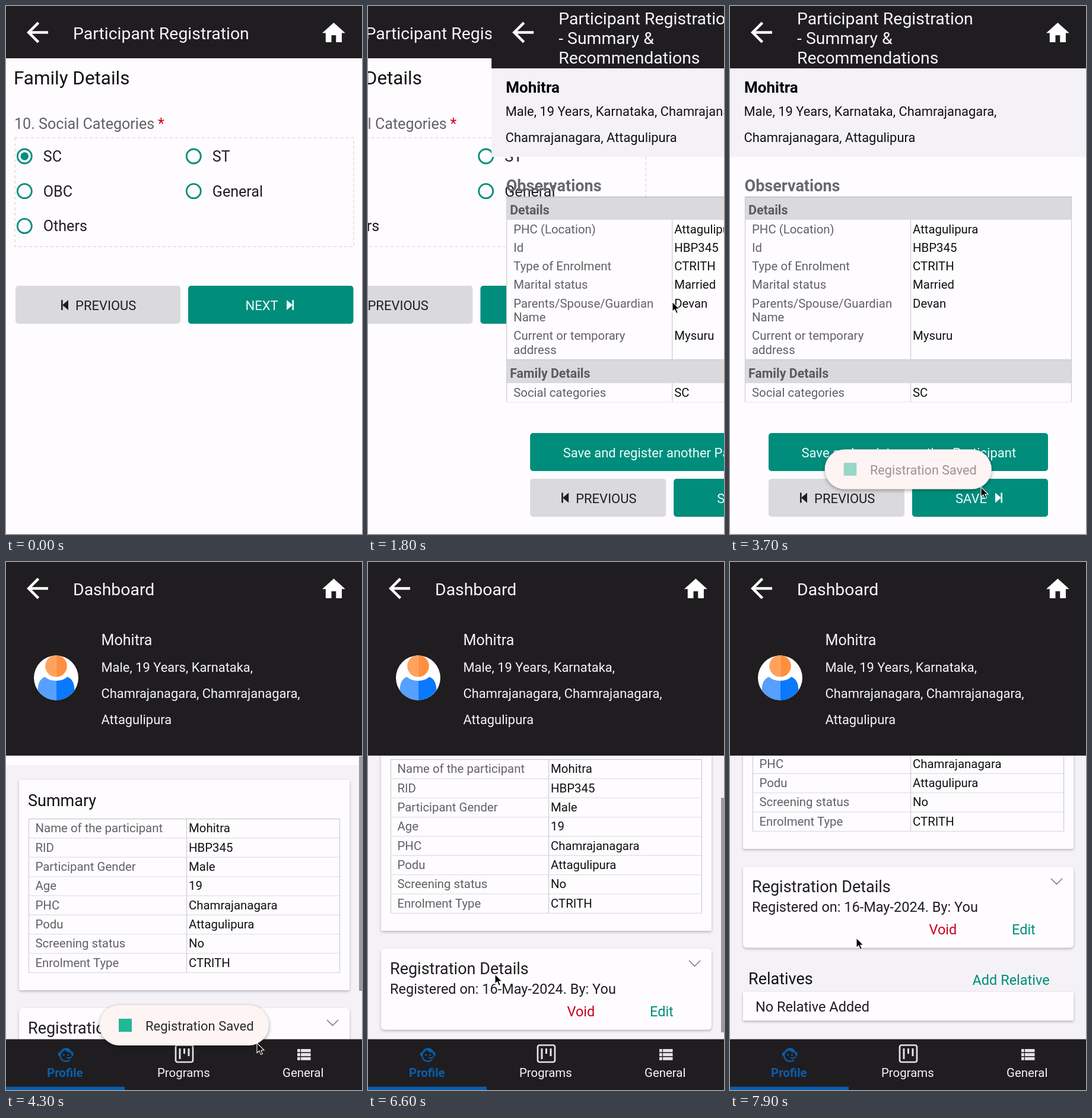
Write an HTML page that moves like this. It is 600x889 px and loops after 8000 ms.

```html
<!DOCTYPE html>
<html lang="en">
<head>
<meta charset="utf-8">
<title>Participant registration</title>
<style>
  html, body { margin: 0; width: 100%; height: 100%; overflow: hidden; background: #fefcff; }
  svg { display: block; width: 100vw; height: 100vh; font-family: Roboto, "Open Sans", sans-serif; }
  .card { filter: drop-shadow(0 2px 2px rgba(0, 0, 0, .25)); }
  .toast { filter: drop-shadow(0 2px 3px rgba(0, 0, 0, .35)); }
</style>
</head>
<body>
<svg id="stage" viewBox="0 0 600 889" preserveAspectRatio="none"></svg>
<script>
const LOOP = 8000, STEP = 100;
const TEAL = '#008d7c', DARK = '#1f1d20', GREY = '#dad9db', PAPER = '#fefcff';
const LABEL = '#626163', INK = '#1f1d20', LINE = '#cfced0';
const person = 'Mohitra', guardian = 'Devan';

// Drawing helpers
const text = (x, y, size, fill, s, extra = '') =>
  `<text x="${x}" y="${y}" font-size="${size}" fill="${fill}" ${extra}>${s.replace(/&/g, '&amp;')}</text>`;
const bold = (x, y, size, fill, s) => text(x, y, size, fill, s, 'font-weight="700"');
const rect = (x, y, w, h, fill, extra = '') =>
  `<rect x="${x}" y="${y}" width="${w}" height="${h}" fill="${fill}" ${extra}/>`;
const path = (d, fill, extra = '') => `<path d="${d}" fill="${fill}" ${extra}/>`;
const stroke = (d, color, width = 1) => path(d, 'none', `stroke="${color}" stroke-width="${width}"`);
const group = (id, body, extra = '') => `<g id="${id}" ${extra}>${body}</g>`;
const button = (x, y, w, fill) => rect(x, y, w, 64, fill, 'rx="5"');

const skipIcon = (x, y, dir, fill) =>
  `<g transform="translate(${x + 6} ${y}) scale(${dir} 1)">` +
  path('M-6-8.5L4 0L-6 8.5Z', fill) + rect(3.4, -8.5, 2.6, 17, fill) + '</g>';

function header(lines, height) {
  const first = lines.length > 1 ? 31 : 56;
  return rect(0, 0, 600, height, DARK) +
    path('M20 11H7.83l5.59-5.59L12 4l-8 8 8 8 1.41-1.41L7.83 13H20z', '#fff', 'transform="translate(26 17.5) scale(2.25)"') +
    path('M10 20V14H14V20H19V12H22L12 3L2 12H5V20Z', '#fff', 'transform="translate(529.1 22.2) scale(1.94)"') +
    lines.map((s, i) => text(113, first + 33 * i, 28.4, '#f6f5f7', s)).join('');
}

function radio(x, y, label, on) {
  return `<circle cx="${x}" cy="${y}" r="12" fill="none" stroke="${TEAL}" stroke-width="2.8"/>` +
    (on ? `<circle cx="${x}" cy="${y}" r="6.7" fill="${TEAL}"/>` : '') +
    text(x + 31.5, y + 9, 25.1, INK, label);
}

function formScreen() {
  return rect(0, 0, 600, 889, PAPER) + header(['Participant Registration'], 88) +
    text(13, 132, 31.4, '#111', 'Family Details') +
    text(14, 206.5, 25.1, LABEL, '10. Social Categories') +
    text(256, 206.5, 25.1, '#d5001c', '*') +
    path('M15 222H586V405H15Z', 'none', 'stroke="#dddcde" stroke-width="1.6" stroke-dasharray="5 4"') +
    radio(31.3, 253, 'SC', true) + radio(316.3, 253, 'ST') +
    radio(31.3, 311.7, 'OBC') + radio(316.3, 311.7, 'General') +
    radio(31.3, 370.4, 'Others') +
    button(16, 471, 278, GREY) + skipIcon(93, 503.5, -1, INK) + text(117, 511.5, 22, INK, 'PREVIOUS') +
    button(307, 471, 278.5, TEAL) + text(403.5, 511.5, 22, '#e9fffb', 'NEXT') + skipIcon(473, 503.5, 1, '#e9fffb');
}

function summaryScreen() {
  const rows = [
    [382.5, 'PHC (Location)', 'Attagulipura'],
    [413.7, 'Id', 'HBP345'],
    [445, 'Type of Enrolment', 'CTRITH'],
    [476.3, 'Marital status', 'Married'],
    [507.7, 'Parents/Spouse/Guardian', guardian],
    [531, 'Name', ''],
    [562.3, 'Current or temporary', 'Mysuru'],
    [585.6, 'address', ''],
    [657.7, 'Social categories', 'SC']
  ];
  return header(['Participant Registration', '- Summary &', 'Recommendations'], 105) +
    rect(0, 105, 600, 149, '#f4f2f6') +
    bold(24, 146, 26, '#000', person) +
    text(23.5, 185, 21.9, '#111', 'Male, 19 Years, Karnataka, Chamrajanagara,') +
    text(23.5, 229, 21.9, '#111', 'Chamrajanagara, Attagulipura') +
    bold(24.5, 312.3, 27, '#69686a', 'Observations') +
    rect(25.5, 321, 550, 346, PAPER) +
    rect(25.5, 321, 550, 39, GREY) + rect(25.5, 596, 550, 39, GREY) +
    stroke('M25.5 667V321M575.5 321V667M304.5 360V595M304.5 635V667M25 595.5H576', LINE, 1.3) +
    stroke('M25 321.5H576', '#bdbcbe', 1.3) + stroke('M25 667H576', '#e6e5e7') +
    bold(31, 350.5, 21.4, '#5b5a5c', 'Details') + bold(31, 626, 21.4, '#5b5a5c', 'Family Details') +
    rows.map(([y, a, b]) => text(37, y, 20.4, LABEL, a) + text(308, y, 20.4, '#111', b)).join('') +
    button(65, 719, 471, TEAL) +
    text(120.5, 759.5, 22, '#e9fffb', 'Save and register another Participant') +
    button(65, 796, 229, GREY) + skipIcon(118, 828, -1, INK) + text(142, 836.5, 22, INK, 'PREVIOUS') +
    button(307, 796, 229, TEAL) + text(380, 836.5, 22, '#e9fffb', 'SAVE') + skipIcon(447, 828, 1, '#e9fffb') +
    group('summaryBar', rect(595, 105, 5, 768, '#9b9a9c'));
}

function avatar() {
  return '<circle cx="84.5" cy="195" r="37.5" fill="#fff"/>' +
    path('M84.5 157a18.3 18.3 0 0 0 0 36.6z', '#ffa25e') +
    path('M84.5 157a18.3 18.3 0 0 1 0 36.6z', '#ff8f3f') +
    path('M84.5 200Q72 200 66 193.5Q54 197 53.5 216Q66 232.5 84.5 232.5Z', '#57a0ff') +
    path('M84.5 200Q97 200 103 193.5Q115 197 115.5 216Q103 232.5 84.5 232.5Z', '#0a78ff');
}

function tabBar() {
  const blue = '#0a5ea9', pale = '#e4e3e5';
  const list = [820, 826.8, 833.6].map(y => rect(491, y, 4.8, 5.2, pale) + rect(497, y, 16.5, 5.2, pale)).join('');
  return rect(0, 803.5, 600, 86, DARK) +
    path('M108 838A10 10 0 1 1 111 829', 'none', `stroke="${blue}" stroke-width="2.3"`) +
    path('M91 828Q97 825 98.5 820Q103 827 111 826Q108 818 101 818Q92 819 91 828Z', blue) +
    rect(88, 825.5, 3, 6, blue) + rect(110.5, 825.5, 3, 6, blue) +
    path('M113 831.5L109 836H102V834H107', blue) +
    `<circle cx="97.5" cy="830" r="1.5" fill="${blue}"/><circle cx="104.5" cy="830" r="1.5" fill="${blue}"/>` +
    rect(286, 813.5, 29, 28.5, 'none', `rx="3" stroke="${pale}" stroke-width="2.7"`) +
    rect(291.5, 819, 3, 18, pale) + rect(299, 819, 3, 9, pale) + rect(306.5, 819, 3, 13, pale) +
    list +
    bold(69, 867, 20.4, blue, 'Profile') +
    text(255, 866.5, 20.4, '#f4f3f5', 'Programs') + text(466, 866.5, 20.4, '#f4f3f5', 'General') +
    rect(0, 883.5, 200, 6, blue);
}

function dashboardScreen() {
  const pitch = 32.35, top = 432.5;
  const rows = [['Name of the participant', person], ['RID', 'HBP345'], ['Participant Gender', 'Male'],
    ['Age', '19'], ['PHC', 'Chamrajanagara'], ['Podu', 'Attagulipura'],
    ['Screening status', 'No'], ['Enrolment Type', 'CTRITH']];
  const bottom = top + pitch * rows.length;
  const table = rows.map(([a, b], i) => {
    const y = top + pitch * i;
    return stroke(`M38 ${y}H563`, i ? '#e2e1e3' : LINE, 1.3) +
      text(49.5, y + 22.7, 20.4, LABEL, a) + text(308, y + 22.7, 20.4, '#111', b);
  }).join('') + stroke(`M38.5 ${top}V${bottom}M304.5 ${top}V${bottom}M562.5 ${top}V${bottom}`, LINE, 1.3) +
    stroke(`M38 ${bottom}H563`, '#dddcde', 1.3);
  const content = rect(0, 326, 600, 16, PAPER) +
    rect(22, 367, 557, 354, PAPER, 'class="card" rx="2"') +
    text(37, 411, 27, '#111', 'Summary') + table +
    rect(22, 751, 557, 136.5, PAPER, 'class="card" rx="6"') +
    text(37, 794, 27, INK, 'Registration Details') +
    text(37, 827, 23.5, INK, 'Registered on: 16-May-2024. By: You') +
    text(335.5, 865, 23.5, '#c8001c', 'Void') + text(475, 865, 23.5, TEAL, 'Edit') +
    stroke('M541 771L550.5 780.5L560 771', '#6d6c6e', 1.4) +
    text(31, 949, 27, '#111', 'Relatives') + text(408.5, 950, 23.5, TEAL, 'Add Relative') +
    rect(22, 962, 557, 48, PAPER, 'class="card"') +
    text(43, 994.5, 23.5, INK, 'No Relative Added');
  return rect(0, 0, 600, 889, '#f4f2f6') + group('content', content) +
    group('dashBar', rect(595, 327, 5, 395, '#9b9a9c')) +
    header(['Dashboard'], 326) + avatar() +
    text(160.5, 139.5, 25.1, '#f4f3f5', person) +
    ['Male, 19 Years, Karnataka,', 'Chamrajanagara, Chamrajanagara,', 'Attagulipura']
      .map((s, i) => text(160.5, 185 + 44 * i, 21.9, '#f4f3f5', s)).join('') + tabBar();
}

const stage = document.getElementById('stage');
stage.innerHTML =
  group('form', formScreen()) + group('summary', summaryScreen()) + group('dashboard', dashboardScreen()) +
  group('toast', rect(157.5, 746, 285.5, 68, '#fff4f4', 'class="toast" rx="34"') +
    group('toastBody', rect(190, 769, 22, 22, '#22b795') + text(235, 788.7, 22, '#2b292b', 'Registration Saved'))) +
  group('cursor', path('M0 0V16.5L3.8 13L6.6 19.4L9.4 18.2L6.7 12H12Z', '#000', 'stroke="#fff" stroke-width="1.1"'));

const el = Object.fromEntries([...stage.querySelectorAll('[id]')].map(n => [n.id, n]));

// Motion
const clamp = u => Math.max(0, Math.min(1, u));
const span = (t, a, b) => clamp((t - a) / (b - a));
const easeOut = u => 1 - (1 - u) ** 2;
const smooth = u => u * u * (3 - 2 * u);
const move = (node, x, y = 0) => node.setAttribute('transform', `translate(${x} ${y})`);
const show = (node, on) => node.setAttribute('display', on ? 'inline' : 'none');
const fade = (node, a) => node.setAttribute('opacity', a);

const cursorKeys = [
  [300, 570, 609], [1150, 513, 498], [2050, 513, 498], [2800, 450, 729], [3250, 423, 810],
  [4650, 423, 810], [5400, 230, 800], [6100, 214, 794], [6380, 214, 794],
  [6600, 214, 694], [6780, 213, 633], [8000, 213, 633]
];
function cursorAt(t) {
  const i = Math.max(1, cursorKeys.findIndex(k => k[0] >= t));
  const [t0, x0, y0] = cursorKeys[i - 1], [t1, x1, y1] = cursorKeys[i];
  const u = smooth(span(t, t0, t1));
  return [x0 + (x1 - x0) * u, y0 + (y1 - y0) * u];
}

function render(t) {
  const first = easeOut(span(t, 1650, 2015)), second = easeOut(span(t, 3850, 4215));
  show(el.form, first < 1);
  move(el.form, -180 * first);
  show(el.summary, first > 0 && second < 1);
  move(el.summary, 600 * (1 - first) - 180 * second);
  show(el.dashboard, second > 0);
  move(el.dashboard, 600 * (1 - second));
  fade(el.summaryBar, 1 - span(t, 3050, 3300));

  const [x, y] = cursorAt(t);
  show(el.cursor, t >= 300);
  move(el.cursor, x, y);

  // The list follows the pointer, then coasts to its end.
  const drag = t < 6380 ? 0 : 794 - y;
  const scroll = Math.min(238, drag + 77 * easeOut(span(t, 6780, 7120)));
  move(el.content, 0, -scroll);
  move(el.dashBar, 0, scroll * .7);
  fade(el.dashBar, t < 6000 ? 1 - span(t, 5480, 5730) : span(t, 6330, 6400) - span(t, 7400, 7650));

  const scale = .97 + .03 * span(t, 3600, 3800) - .03 * span(t, 5600, 5800);
  show(el.toast, t > 3600 && t < 5800);
  fade(el.toast, span(t, 3600, 3680) * (1 - span(t, 5650, 5800)));
  fade(el.toastBody, span(t, 3620, 3790) * (1 - span(t, 5600, 5720)));
  el.toast.setAttribute('transform', `translate(300 780) scale(${scale}) translate(-300 -780)`);
}

// The picture advances ten times a second, like a screen recording.
const start = performance.now();
function tick() {
  const t = (performance.now() - start) % LOOP;
  render(Math.floor(t / STEP) * STEP);
  requestAnimationFrame(tick);
}
tick();
</script>
</body>
</html>
```
